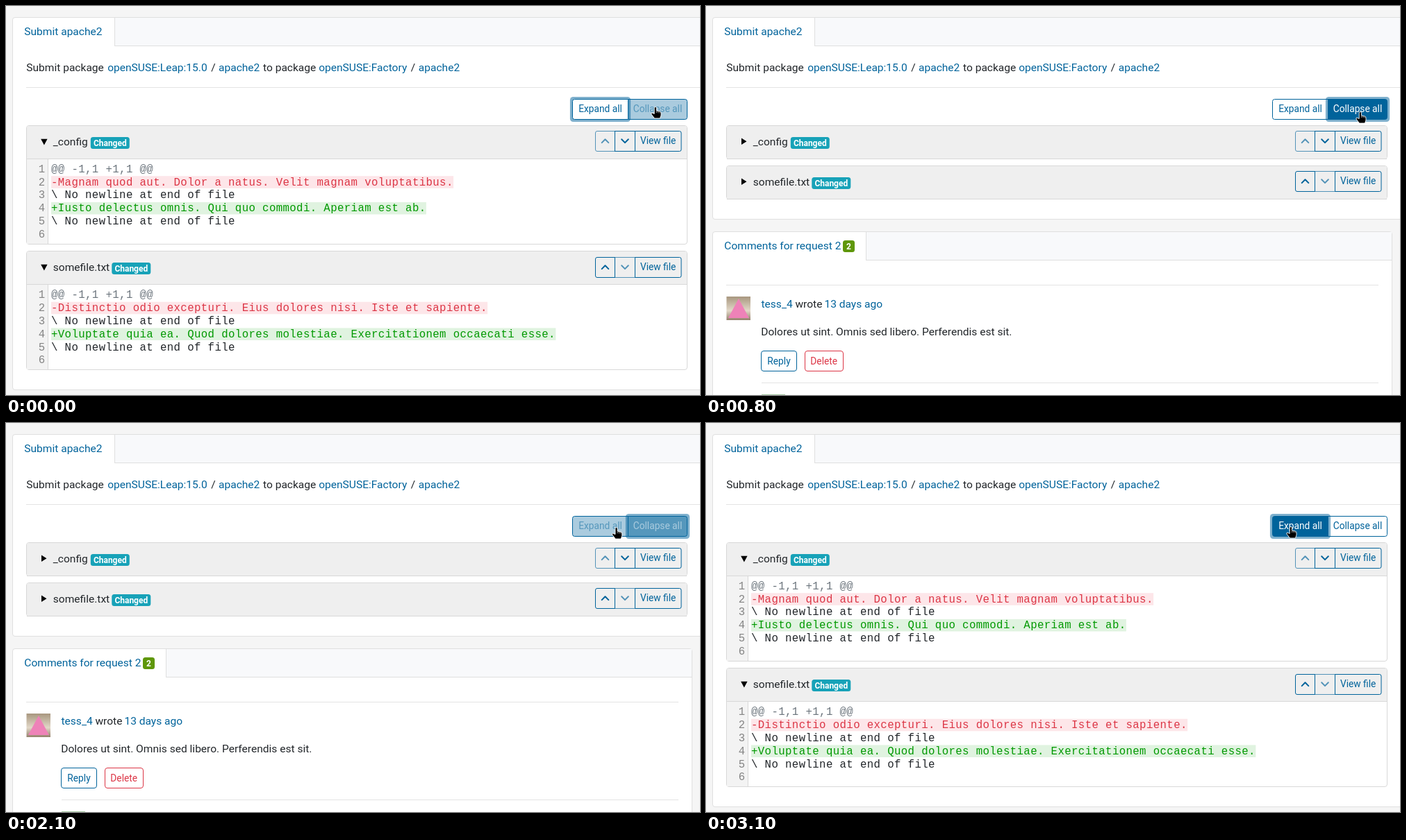
An HTML page for the animation above (4100 ms loop, 999 px wide and 561 px high).

```html
<!DOCTYPE html>
<html lang="en">
<head>
<meta charset="utf-8">
<title>Expand and collapse all files</title>
<style>
html, body { margin: 0; width: 100%; height: 100%; overflow: hidden; background: #f5f5f5; }
svg { display: block; }
text { font: 15.55px Roboto, sans-serif; white-space: pre; }
.small { font-size: 13.74px; }
.badge { font-size: 12px; font-weight: 700; }
.code { font: 15.7px "Liberation Mono", monospace; letter-spacing: .395px; }
</style>
</head>
<body>
<svg id="stage" width="999" height="561" viewBox="0 0 999 561"></svg>
<script>
const LOOP = 4100, STEP = 100;
const BLUE = '#00639b', INK = '#212529', RED = '#dc3545', GRAY = '#6c757d', LINE = '#dfdfdf';
const CHAR = 9.816, ROW = 18.83;
const stage = document.getElementById('stage');

const clamp = v => Math.min(1, Math.max(0, v));
const ramp = (t, start, length = 150) => clamp((t - start) / length);
const easeOut = p => 1 - (1 - p) ** 2;
const easeInOut = p => p ** 3 * (10 - 15 * p + 6 * p * p);
const blueToWhite = k => `rgb(${255 * k},${99 + 156 * k},${155 + 100 * k})`;

const text = (x, y, s, fill = INK, more = '') => `<text x="${x}" y="${y}" fill="${fill}" ${more}>${s}</text>`;
const centered = (x, y, s, fill, cls = 'small') => text(x, y, s, fill, `class="${cls}" text-anchor="middle"`);
const rect = (x, y, w, h, fill, more = '') =>
  `<rect x="${x}" y="${y}" width="${w}" height="${h}" fill="${fill}" ${more}/>`;
const path = (d, fill, more = '') => `<path d="${d}" fill="${fill}" ${more}/>`;
const rule = (x, y, w, fill = '#e3e3e3') => rect(x, y, w, 1, fill);
const box = (x, y, w, h, fill, stroke, r = 3.5) =>
  rect(x + .5, y + .5, w - 1, h - 1, fill, `stroke="${stroke}" rx="${r}"`);

// White card with a header strip and one active tab
function card(y, w, h, tabEnd, title) {
  return box(9, y, w, h, '#fff', LINE) +
    path(`M${tabEnd} ${y + 1}H${8 + w}V${y + 41}H${tabEnd}Z`, '#f8f9fb') +
    rule(tabEnd - 1, y + 41, w + 9 - tabEnd, LINE) + rect(tabEnd - 1, y, 1, 42, LINE) +
    text(26.3, y + 26.2, title, BLUE);
}

function badge(x, y, w, s, fill) {
  return rect(x, y, w, 17, fill, 'rx="3.5"') + centered(x + w / 2, y + 12.7, s, '#fff', 'badge');
}

function groupButton(x, w, label, hover, focus, corners) {
  const ring = 3.1 * focus, y = 134;
  const shape = corners === 'left'
    ? `M${x + w - .5} ${y + .5}V163.5H${x + 3.5}q-3 0-3-3V${y + 3.5}q0-3 3-3Z`
    : `M${x + .5} ${y + .5}H${x + w - 3.5}q3 0 3 3V160.5q0 3-3 3H${x + .5}Z`;
  return rect(x - ring, y - ring, w + 2 * ring, 30 + 2 * ring, BLUE, `opacity="${focus / 2}" rx="${3 + ring / 2}"`) +
    path(shape, blueToWhite(1 - hover), `stroke="${BLUE}"`) +
    centered(x + w / 2, 153.3, label, blueToWhite(hover));
}

function codeLine(s, i, y) {
  const base = y + 67.8 + ROW * i;
  const [fill, back] = { '@': [GRAY], '-': [RED, '#fde6e9'], '+': ['#009900', '#e0f3e0'] }[s[0]] || [INK];
  return (back ? rect(65, base - 13.4, s.length * CHAR, 17.6, back) : '') +
    text(46.8, base, i + 1, '#858585', 'class="code"') + text(65, base, s, fill, 'class="code"');
}

function fileButtons(y, isFirst) {
  const line = `stroke="${BLUE}"`;
  const chevron = (x, dir) => path(`M${x - 4.8} ${y + 14.7 + 2.4 * dir}l4.8 ${-4.8 * dir}l4.8 ${4.8 * dir}`, 'none',
    `${line} stroke-width="2" stroke-linecap="round" stroke-linejoin="round"`);
  const fade = s => `<g opacity=".65">${s}</g>`;
  const up = path(`M876.5 ${y + .5}H851q-2.5 0-2.5 2.5v24q0 2.5 2.5 2.5h25.5Z`, 'none', line) + chevron(862.5, 1);
  const down = box(876, y, 30, 30, 'none', BLUE, 0) + chevron(891, -1);
  return (isFirst ? fade(up) + down : fade(down) + up) +
    path(`M905.5 ${y + .5}h64q2.5 0 2.5 2.5v24q0 2.5-2.5 2.5h-64Z`, 'none', line) +
    centered(938.6, y + 19.4, 'View file', BLUE);
}

function fileCard(top, open, name, badgeX, isFirst, removed, added) {
  const y = Math.floor(top), h = open ? 172 : 49;
  let out = box(29, y, 952, h, '#fff', '#d8d8d8') +
    rect(30, y + 1, 950, open ? 48 : 47, '#efefef', 'rx="2.5"') + rule(30, y + 48, 950, '#d8d8d8');
  out += open
    ? path(`M50.2 ${y + 19.7}h9.4l-4.7 8.8Z`, '#000')
    : path(`M51 ${y + 18.6}v9.4l7.5-4.7Z`, '#000');
  out += text(67.8, y + 29.4, name) + badge(badgeX, y + 17, 56, 'Changed', '#17a2b8') +
    fileButtons(Math.round(top + 8), isFirst);

  if (open) {
    const end = '\\ No newline at end of file';
    out += rect(30, y + 49, 30, 122, '#f3f3f3') + rect(60, y + 49, 1, 122, '#d8d8d8') +
      ['@@ -1,1 +1,1 @@', removed, end, added, end, ''].map((s, i) => codeLine(s, i, top)).join('');
  }
  return out;
}

function comments() {
  return card(325, 979, 260, 231, 'Comments for request 2') +
    badge(197, 338, 17, '2', '#5f970a') + rule(29, 402, 939) +
    `<linearGradient id="tan" x2="0" y2="1"><stop stop-color="#a8977f"/><stop offset=".6" stop-color="#e2d8c8"/>
     <stop offset="1" stop-color="#94806c"/></linearGradient>` +
    rect(29.5, 419, 34.5, 34, 'url(#tan)') + path('M47 422L62 450H32Z', '#ee82b8') +
    text(79.5, 435.3, 'tess_4', BLUE) + text(128.4, 435.3, 'wrote') + text(170.4, 435.3, '13 days ago', BLUE) +
    text(79.2, 474.5, 'Dolores ut sint. Omnis sed libero. Perferendis est sit.') +
    box(79, 497, 52, 30, '#fff', BLUE) + centered(105, 517, 'Reply', BLUE) +
    box(142, 497, 56, 30, '#fff', RED) + centered(169.7, 517, 'Delete', RED) +
    rule(80, 543, 888) + rect(80, 560, 34, 1, '#a9cba5');
}

function hand(x, y) {
  return `<g transform="translate(${x} ${y})">` +
    path('M-1.8 10V1.6Q-1.8 0-.2 0Q1.4 0 1.4 1.6V5.4L6.4 6.6Q8 7 8 9V12L6.5 16.5H-1.5L-6 10.6Q-6.8 8.8-5 8.5Z',
      '#000', 'stroke="#fff" stroke-width=".9"') +
    path('M1.5 6v2.5M3.8 6.5v2.3M6 7v2', 'none', 'stroke="#fff" stroke-width=".6"') + '</g>';
}

function draw(t) {
  const open = t < 800 || t >= 3100;
  const focusCollapse = ramp(t, 600) - ramp(t, 2900), focusExpand = 1 - focusCollapse;
  const hoverExpand = ramp(t, 2050), hoverCollapse = ramp(t, -50) - hoverExpand;
  const enter = easeOut(ramp(t, 0, 200)), cross = easeInOut(ramp(t, 1700, 700));

  const title = [[29.3, 'Submit package'], [146.2, 'openSUSE:Leap:15.0', 1], [295.2, '/'], [306, 'apache2', 1],
    [370, 'to package'], [450.2, 'openSUSE:Factory', 1], [582.8, '/'], [593.8, 'apache2', 1]];
  const buttons = [
    groupButton(815, 81, 'Expand all', hoverExpand, focusExpand, 'left'),
    groupButton(895, 86, 'Collapse all', hoverCollapse, focusCollapse, 'right')
  ];
  if (focusExpand > hoverCollapse) buttons.reverse();

  stage.innerHTML = card(16, 1010, open ? 538 : 292, 157, 'Submit apache2') +
    title.map(([x, s, link]) => text(x, 94.3, s, link ? BLUE : INK)).join('') +
    rule(29, 117, 970) + buttons.join('') +
    fileCard(172, open, '_config', 121.8, true,
      '-Magnam quod aut. Dolor a natus. Velit magnam voluptatibus.',
      '+Iusto delectus omnis. Qui quo commodi. Aperiam est ab.') +
    fileCard(open ? 353.5 : 230, open, 'somefile.txt', 152.3, false,
      '-Distinctio odio excepturi. Eius dolores nisi. Iste et sapiente.',
      '+Voluptate quia ea. Quod dolores molestiae. Exercitationem occaecati esse.') +
    (open ? '' : comments()) +
    hand(935 + 7 * enter - 100 * cross, 145.5 + 7 * enter - 3 * cross);
}

let shown = -1;
function tick() {
  const t = Math.floor(performance.now() % LOOP / STEP) * STEP;
  if (t !== shown) draw(shown = t);
  requestAnimationFrame(tick);
}
tick();
</script>
</body>
</html>
```
